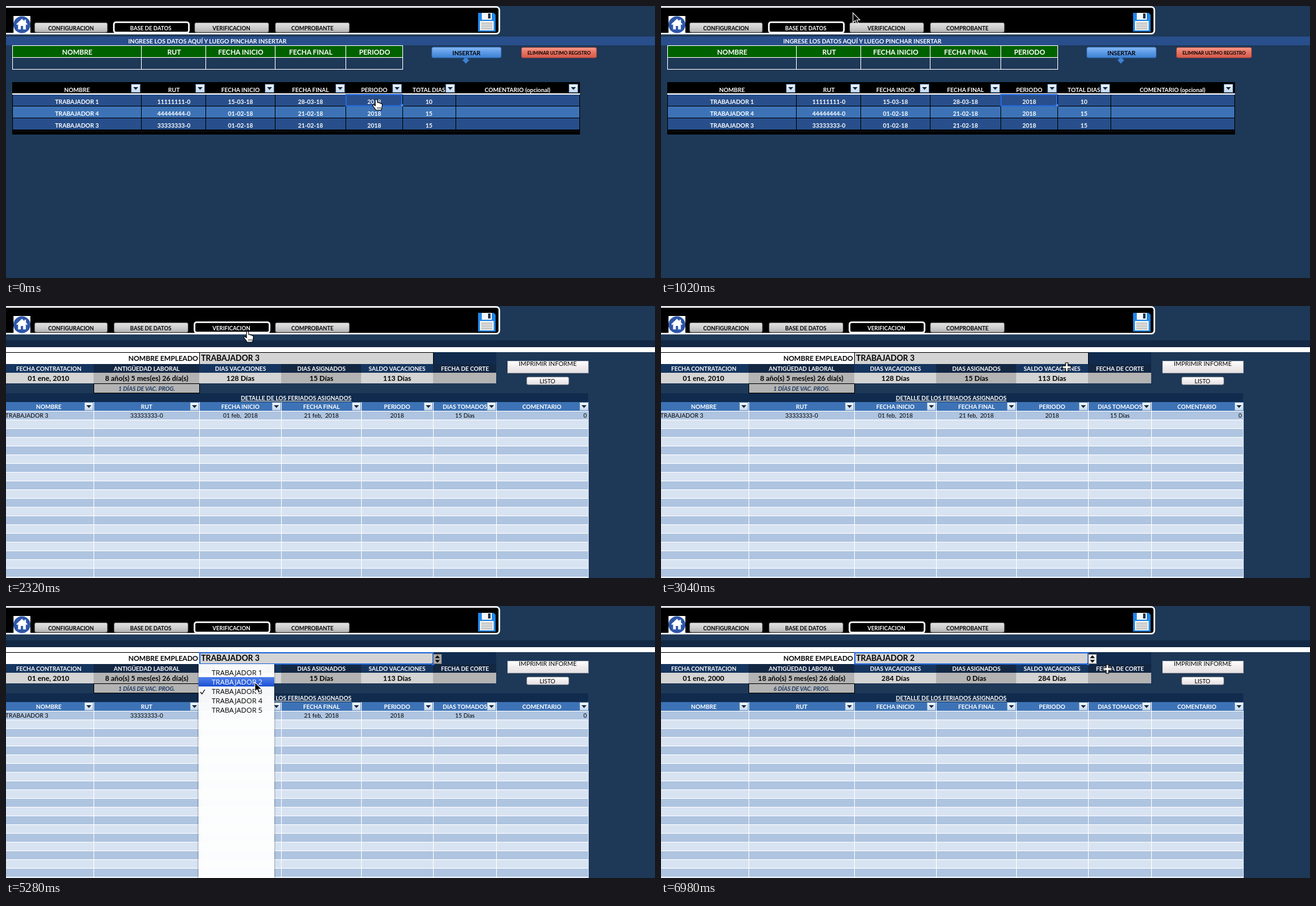
Write an HTML page that moves like this. It is 1038 by 436 pixels and loops after 7 s.

```html
<!DOCTYPE html>
<html lang="es">
<head>
<meta charset="utf-8">
<title>Control de vacaciones</title>
<style>
html, body { margin: 0; width: 100%; height: 100%; overflow: hidden; background: #1e3857; }
svg { display: block; font-family: Lato, "Open Sans", sans-serif; }
svg text { white-space: pre; }
rect, line { shape-rendering: crispEdges; }
.soft { shape-rendering: auto; }
.sys { font-family: "Open Sans", "Noto Sans", sans-serif; }
</style>
</head>
<body>
<svg id="stage" width="1038" height="436" viewBox="0 0 1038 436"></svg>
<script>
const LOOP = 7000;
const BG = '#1e3857', DEEP = '#102b4d', ROW = '#284f8b', ROW_LIGHT = '#3d73b6', SELECT = '#2468dc';

const rect = (x, y, w, h, fill, more = '') =>
  `<rect x="${x}" y="${y}" width="${w}" height="${h}" fill="${fill}" ${more}/>`;
const path = (d, fill, more = '') => `<path d="${d}" fill="${fill}" ${more}/>`;
const text = (x, y, s, size, fill = '#fff', more = '') =>
  `<text x="${x}" y="${y}" font-size="${size}" fill="${fill}" text-anchor="middle" font-weight="700" ${more}>${s}</text>`;
const plain = (x, y, s, size, fill = '#000', anchor = 'middle', more = '') =>
  `<text x="${x}" y="${y}" font-size="${size}" fill="${fill}" text-anchor="${anchor}" ${more}>${s}</text>`;
const group = (id, body) => `<g id="${id}">${body}</g>`;
const grad = (id, ...colors) =>
  `<linearGradient id="${id}" x1="0" y1="0" x2="0" y2="1">${colors.map((c, i) =>
    `<stop offset="${i / (colors.length - 1)}" stop-color="${c}"/>`).join('')}</linearGradient>`;
const round = r => `rx="${r}" class="soft"`;

const filterButton = (x, y) =>
  rect(x + .5, y + .5, 14, 13, 'url(#filter)', 'stroke="#5f87b8"') +
  path(`M${x + 3.5} ${y + 5}h8l-4 4.5z`, '#16263c');

function tab(x, w, cx, label, active) {
  const box = active
    ? rect(x - .5, 26, w + 2, 16.5, '#000', 'stroke="#fff" stroke-width="2.6" ' + round(3.5))
    : rect(x, 27, w, 15, 'url(#gray)', 'stroke="#8d8d8d" stroke-width=".6" ' + round(2));
  return box + text(cx, 39, label, 8.7, active ? '#fff' : '#000');
}

function topBar(active) {
  const tabs = [[46, 116, 104, 'CONFIGURACION'], [173, 118, 231.5, 'BASE DE DATOS'],
    [302, 118, 360.5, 'VERIFICACION'], [431, 118, 490, 'COMPROBANTE']];
  const home = rect(12, 16, 27, 27, '#fff') +
    '<circle cx="25.5" cy="30" r="13.6" fill="#2d56a8"/>' +
    path('M25.5 20.5l-9 8.5 1.3 1.4 1.5-1.3v8.4h4.4v-5.5h3.6v5.5h4.4v-8.4l1.5 1.3 1.3-1.4-2.6-2.5v-4.4h-2.4v2.2z', '#fff');
  const disk = path('M755 11h25l3 3v27h-28z', '#1f86e8') +
    rect(761, 11, 16, 11, '#f4f7fa') + rect(771, 12, 4, 8, '#21344d') +
    rect(758, 24, 22, 15, '#f4f4f0') +
    [27, 30, 33, 36].map(y => rect(760, y, 18, 1, '#8b9298')).join('');
  return rect(-6, 1.5, 795, 42.8, '#000', 'stroke="#fff" stroke-width="2.6" ' + round(5)) +
    home + tabs.map((t, i) => tab(...t, i === active)).join('') + disk;
}

function database() {
  const cols = [10, 216, 319, 430, 543, 634, 719, 917];
  const mid = [113.5, 268.5, 375, 487, 589, 676.5, 818];
  const heads = ['NOMBRE', 'RUT', 'FECHA INICIO', 'FECHA FINAL', 'PERIODO', 'TOTAL DIAS', 'COMENTARIO (opcional)'];
  const rows = [
    ['TRABAJADOR 1', '11111111-0', '15-03-18', '28-03-18', '2018', '10'],
    ['TRABAJADOR 4', '44444444-0', '01-02-18', '21-02-18', '2018', '15'],
    ['TRABAJADOR 3', '33333333-0', '01-02-18', '21-02-18', '2018', '15']];
  let s = rect(0, 0, 1038, 436, BG) + topBar(1) + rect(0, 49, 1038, 14, ROW) +
    text(322, 60, 'INGRESE LOS DATOS AQUÍ Y LUEGO PINCHAR INSERTAR', 9.55);

  s += rect(10, 63, 624, 19, '#006100');
  for (const y of [63, 82, 101]) s += rect(10, y, 624, 1, '#fff');
  for (const x of cols.slice(0, 6)) s += rect(x, 63, 1, 39, '#fff');
  heads.slice(0, 5).forEach((h, i) => s += text(mid[i] + .5, 77.5, h, 11));

  s += path('M732.5 82h6v4h3l-6 6.5-6-6.5h3z', '#3f82d2') +
    rect(681, 66, 111, 17, 'url(#blue)', 'stroke="#2d66b0" stroke-width=".8" ' + round(2.5)) +
    text(736.5, 79, 'INSERTAR', 9.6, '#000') +
    rect(824.5, 66.5, 120, 16.5, 'url(#red)', 'stroke="#a8443a" stroke-width=".8" ' + round(2.5)) +
    text(884.5, 78, 'ELIMINAR ULTIMO REGISTRO', 7.3, '#000');

  s += rect(10, 122, 908, 84, '#000') + rect(10, 140, 908, 2, '#fff');
  rows.forEach((row, r) => {
    const y = 142 + r * 19;
    s += rect(10, y, 907, 18, r % 2 ? ROW_LIGHT : ROW);
    row.forEach((v, i) => s += text(mid[i], y + 15, v, 9.45));
  });
  for (const x of cols) s += rect(x, 142, 1, 57, '#000');
  s += rect(11, 201, 906, 3, 'url(#dots)');
  heads.forEach((h, i) => {
    s += text(mid[i], 138, h, 9.35);
    if (cols[i + 1]) s += filterButton(cols[i + 1] - (i === 6 ? 17 : 16), 125);
  });
  return s + rect(544, 142, 89, 18, 'none', `stroke="${SELECT}" stroke-width="2"`) +
    rect(631, 157, 4, 4, '#4d8cf0', 'stroke="#284f8b" stroke-width=".6"');
}

function record(id, hired, age, days, used, left, prog) {
  return group(id, [hired, age, days, used, left].map((v, i) =>
    text([68, 225, 375, 504.5, 625.5][i], 120, v, 11.4, '#000')).join('') +
    text(225, 136, prog, 9.3, '#1d3961', 'font-style="italic"'));
}

function verification() {
  const cols = [0, 140, 309, 440, 568, 683, 784, 931];
  const mid = [68.5, 225, 375, 504.5, 625.5, 734, 857];
  const tops = ['FECHA CONTRATACION', 'ANTIGÜEDAD LABORAL', 'DIAS VACACIONES', 'DIAS ASIGNADOS', 'SALDO VACACIONES', 'FECHA DE CORTE'];
  const heads = ['NOMBRE', 'RUT', 'FECHA INICIO', 'FECHA FINAL', 'PERIODO', 'DIAS TOMADOS', 'COMENTARIO'];
  let s = rect(0, 0, 1038, 436, BG) + topBar(2) +
    rect(0, 55, 1038, 11, '#132845') + rect(0, 66, 1038, 8, '#fff') +
    rect(0, 74, 309, 19, '#fff') + rect(683, 74, 101, 19, DEEP) +
    rect(309, 74, 375, 19, '#d4d4d4') + rect(0, 74, 684, 1, '#000') +
    rect(309, 74, 1, 19, '#000') + rect(683, 74, 1, 19, '#000') +
    text(251.5, 88, 'NOMBRE EMPLEADO', 11, '#000');

  tops.forEach((h, i) => {
    const x = cols[i], w = cols[i + 1] - x;
    s += rect(x, 93, w, 14, i % 2 ? '#132743' : '#15355f') +
      rect(x, 107, w, 17, i % 2 ? '#b3b3b3' : '#d4d4d4') + text(mid[i], 104, h, 9.25);
  });
  s += rect(140.5, 124.5, 169, 15, '#b3b3b3', 'stroke="#000"') +
    rect(0, 140, 931, 14, DEEP) +
    text(464, 151, 'DETALLE DE LOS FERIADOS ASIGNADOS', 9.3, '#fff', 'text-decoration="underline"') +
    rect(0, 154, 931, 14, ROW_LIGHT);

  for (let y = 168, i = 0; y < 436; y += 14, i++)
    s += rect(0, y, 931, 14, i % 2 ? '#d8e3f2' : '#aec4e0') + rect(0, y, 931, 1, '#fff');
  cols.slice(1).forEach((x, i) => {
    s += rect(x, 154, 1, 282, i === 6 ? '#d8e3f2' : '#fff') + filterButton(x - (i === 6 ? 14 : 15), 154);
  });
  heads.forEach((h, i) => s += text(mid[i], 165, h, 9.3));

  s += rect(802, 88, 129, 19, 'url(#paper)', 'stroke="#c8c2c4" stroke-width=".7"') +
    plain(866.5, 96, 'IMPRIMIR INFORME', 9.9) +
    rect(833, 114, 67, 12, 'url(#paper)', 'stroke="#aaa" stroke-width=".7" ' + round(2)) +
    plain(866, 124, 'LISTO', 9.3);

  s += group('rowData', plain(-1, 179, 'TRABAJADOR 3', 9.4, '#000', 'start') +
    ['33333333-0', '01 feb,&#160; 2018', '21 feb,&#160; 2018', '2018', '15 Días'].map((v, i) =>
      plain(mid[i + 1], 179, v, 9.4)).join('') + plain(929, 179, '0', 9.4, '#000', 'end'));
  s += record('before', '01 ene, 2010', '8 año(s) 5 mes(es) 26 día(s)', '128 Días', '15 Días', '113 Días', '1 DÍAS DE VAC. PROG.');
  s += record('after', '01 ene, 2000', '18 año(s) 5 mes(es) 26 día(s)', '284 Días', '0 Días', '284 Días', '6 DÍAS DE VAC. PROG.');
  s += '<text id="employee" x="312" y="88" font-size="12.6" font-weight="700"></text>';
  s += group('picked', rect(310, 75, 373, 18, 'none', `stroke="${SELECT}" stroke-width="2"`) +
    rect(681, 91, 4, 4, SELECT) +
    rect(683.5, 77.5, 13, 15, '#f2f2f2', 'id="stepper" stroke="#777"') +
    path('M686 83.5h8l-4-4.5zM686 86.5h8l-4 4.5z', '#000'));
  return s;
}

const menu = () => rect(306, 93, 125, 343, '#000', 'opacity=".13"') +
  rect(308, 93, 121, 343, '#fff', 'opacity=".96"') +
  group('bar', rect(308, 0, 121, 15, 'url(#hover)')) +
  [1, 2, 3, 4, 5].map(n => plain(329, 96 + n * 15, 'TRABAJADOR ' + n, 11.5, '#000', 'start', 'class="sys item"')).join('') +
  '<path d="M311 138l2.5 3 4.5-7" fill="none" stroke="#000" stroke-width="1.2"/>';

const tooltip = () => rect(360.5, 46.5, 547, 17, '#e2e3bb', 'stroke="#a9a98c"') +
  plain(362, 59, 'file://localhost/Users/LKP/Desktop/RRHH/Programa Vac/VACACIONES LEGALES V 3.0.xlsm – VERIFICACION!A1',
    10.7, '#111', 'start', 'class="sys"');

const cursors = {
  hand: path('M-1.5 1.2Q0-.8 1.4 1.2L2.4 6 3.8 5.4 5 6.4 6.4 6 7.4 7.4 9 7.4 9.8 9.5 9.2 13.5 8 18H-.5L-2.5 14.5-5.6 10.8Q-5.6 8.8-3.6 9.3L-1.2 11z',
    '#fff', 'stroke="#000" stroke-width="1.1" stroke-linejoin="round"') +
    path('M2.2 13v3M4.4 13v3M6.6 13v3', 'none', 'stroke="#000" stroke-width=".8"'),
  arrow: path('M0 0V15.5L3.6 12.2 6 17.6 8.6 16.4 6.2 11.2H11z', '#000', 'stroke="#fff" stroke-width="1.1"'),
  plus: path('M-2-7h4v5h5v4h-5v5h-4v-5h-5v-4h5z', '#fff', 'stroke="#000" stroke-width="1.2"')
};

const stage = document.getElementById('stage');
stage.innerHTML = `<defs>
  ${grad('gray', '#e4e4e4', '#cfcfcf', '#b4b4b4')}${grad('blue', '#86b8f4', '#5c9ae6', '#3d7fd2')}
  ${grad('red', '#f59a8b', '#e6715f', '#d65a4a')}${grad('paper', '#fff', '#f1edef', '#e6e1e3')}
  ${grad('filter', '#f3f8fd', '#c3d7ec')}${grad('hover', '#5080ea', '#1a4fd4')}
  <pattern id="dots" width="3" height="3" patternUnits="userSpaceOnUse"><rect width="1" height="1" fill="#3a2a2a"/></pattern>
  </defs>` + group('database', database()) + group('verification', verification()) +
  group('menu', menu()) + group('tooltip', tooltip()) +
  group('pointer', Object.keys(cursors).map(k => group(k, cursors[k])).join(''));

const $ = id => document.getElementById(id);
const show = (id, on) => $(id).style.display = on ? '' : 'none';
const items = [...document.querySelectorAll('.item')];

// time, x, y of the pointer's hot spot
const route = [[0, 592, 149], [160, 592, 149], [820, 307, 11], [1440, 307, 11], [1660, 378, 38], [2260, 378, 38],
  [2860, 649, 98], [3100, 649, 98], [3340, 652, 85], [3460, 652, 85], [3780, 719, 85], [4160, 719, 85],
  [4420, 690, 86], [4660, 690, 86], [5200, 398, 122], [5760, 398, 122], [6480, 714, 101], [LOOP, 714, 101]];
const kinds = [[0, 'hand'], [160, 'plus'], [620, 'arrow'], [1580, 'hand'], [2340, 'plus'],
  [4360, 'arrow'], [5840, 'plus']];

function pointerAt(t) {
  const i = Math.max(1, route.findIndex(p => p[0] > t));
  const [t0, x0, y0] = route[i - 1], [t1, x1, y1] = route[i];
  const u = (t - t0) / (t1 - t0), e = u * u * (3 - 2 * u);
  return [Math.round(x0 + (x1 - x0) * e), Math.round(y0 + (y1 - y0) * e)];
}

function draw(t) {
  const [x, y] = pointerAt(t);
  const kind = kinds.filter(k => k[0] <= t).pop()[1];
  const second = t >= 2140, open = t >= 4600 && t < 5780, changed = t >= 5840;
  show('database', !second);
  show('verification', second);
  show('tooltip', t >= 1760 && !second);
  show('picked', t >= 3400);
  show('before', !changed);
  show('after', changed);
  show('rowData', !changed);
  show('menu', open);
  $('employee').textContent = 'TRABAJADOR ' + (changed ? 2 : 3);
  $('stepper').setAttribute('fill', open ? '#a9a9a9' : '#f2f2f2');

  const inside = y >= 99 && x >= 308 && x < 429;
  const hover = inside ? Math.floor((y - 99) / 15) : -1;
  show('bar', open && hover >= 0 && hover < 5);
  $('bar').setAttribute('transform', `translate(0 ${99 + hover * 15})`);
  items.forEach((el, i) => el.setAttribute('fill', i === hover ? '#fff' : '#000'));

  for (const k in cursors) show(k, k === kind);
  $('pointer').setAttribute('transform', `translate(${x} ${y})`);
}

const start = performance.now();
function tick() {
  draw((performance.now() - start) % LOOP);
  requestAnimationFrame(tick);
}
tick();
</script>
</body>
</html>
```
